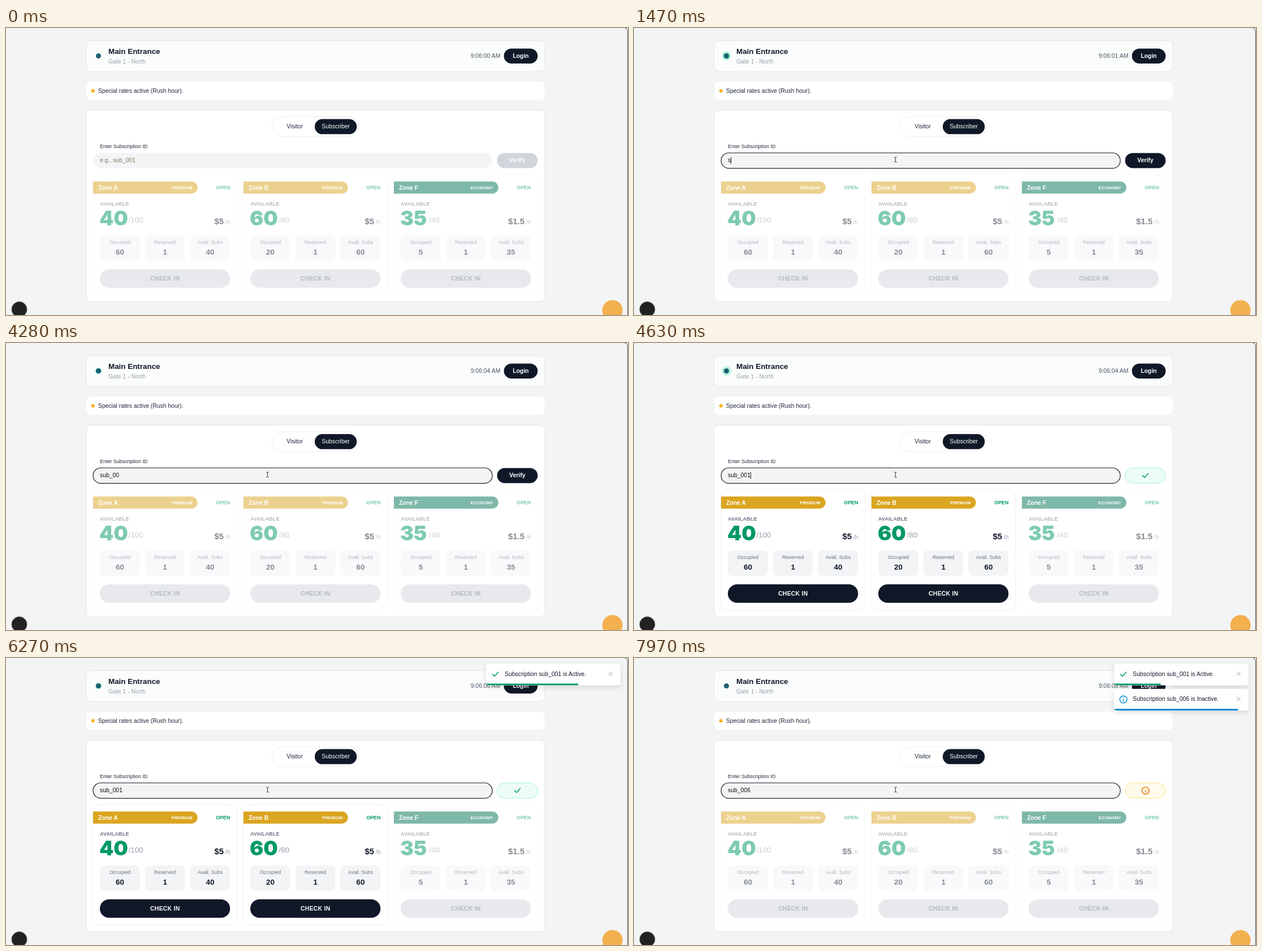
An HTML page that plays this animation: 1100 px wide and 509 px high, repeating every 8000 ms.

```html
<!DOCTYPE html>
<html lang="en">
<head>
<meta charset="utf-8">
<title>Gate check-in</title>
<style>
  html, body { margin: 0; width: 100%; height: 100%; overflow: hidden; background: #f3f4f6; }
  svg { display: block; font-family: "Liberation Sans", Arial, sans-serif; }
  .card { filter: drop-shadow(0 .7px 1px rgba(0,0,0,.14)); }
  .toast { filter: drop-shadow(0 3px 5px rgba(0,0,0,.12)); }
  .line { fill: none; stroke-linecap: round; stroke-linejoin: round; }
</style>
</head>
<body>
<svg id="stage" width="1100" height="509" viewBox="0 0 1100 509"></svg>
<script>
const LOOP = 8000;
const INK = '#101828', GREEN = '#009966', MUTED = '#6a7282', PALE = '#99a1af', FIELD = '#f3f4f6';
const XS = 7.44, S = 8.93, M = 10.42, L = 13.4, XL = 14.9;

const rect = (x, y, w, h, r, fill, more = '') =>
  `<rect x="${x}" y="${y}" width="${w}" height="${h}" rx="${r}" fill="${fill}" ${more}/>`;
const circle = (x, y, r, fill, more = '') => `<circle cx="${x}" cy="${y}" r="${r}" fill="${fill}" ${more}/>`;
const text = (x, y, size, fill, str, more = '') =>
  `<text x="${x}" y="${y}" font-size="${size}" fill="${fill}" ${more}>${str}</text>`;
const line = (d, color, width = 1.3) => `<path class="line" d="${d}" stroke="${color}" stroke-width="${width}"/>`;
const bold = 'font-weight="700"', mid = 'text-anchor="middle"', end = 'text-anchor="end"';
const spaced = px => `letter-spacing="${px}"`;

const tick = (x, y, color) => line(`M${x - 5} ${y}l3.4 3.7l6.6 -7.4`, color, 1.5);
const info = (x, y, color) =>
  circle(x, y, 6.3, 'none', `stroke="${color}" stroke-width="1.4"`) +
  line(`M${x} ${y}v3M${x} ${y - 2.8}v.1`, color, 1.5);

function zone(id, x, name, tier, strip, free, total, price, taken) {
  const stats = [['Occupied', taken], ['Reserved', 1], ['Avail. Subs', free]].map(([label, n], i) => {
    const left = x + 12 + i * 79.7;
    return rect(left, 368, 70.7, 45, 8, FIELD) +
      text(left + 35.5, 383.3, S, MUTED, label, mid) +
      text(left + 35.5, 401.5, XL * .9, INK, n, mid + ' ' + bold);
  }).join('');
  return `<g id="${id}" opacity=".5">
    ${rect(x, 260.5, 254.5, 212.5, 12, '#fff', 'class="card"')}
    <path d="M${x} 272.3h174a10.7 10.7 0 0 1 0 21.4h-174z" fill="${strip}"/>
    ${text(x + 9, 286.7, M, '#fff', name, bold)}
    ${text(x + 175.8, 285.5, XS, '#fff', tier, `${bold} ${end} ${spaced(.25)}`)}
    ${text(x + 242.5, 286.1, S, GREEN, 'OPEN', bold + ' ' + end)}
    ${text(x + 12, 314.6, S, MUTED, 'AVAILABLE', bold + ' ' + spaced(.2))}
    ${text(x + 11, 349.5, 36, GREEN, free, 'font-weight="900" style="font-family:Inter,sans-serif"')}
    ${text(x + 62.5, 344.5, L, PALE, '/' + total)}
    ${text(x + 231, 348, XL, INK, price, bold + ' ' + end)}
    ${text(x + 242.5, 348, M, PALE, '/h', end)}
    ${stats}
    ${rect(x + 12, 428, 230.3, 32.8, 16.4, '#d1d5dc', 'class="button"')}
    ${text(x + 127.3, 447.6, M, MUTED, 'CHECK IN', `class="caption" ${bold} ${mid} ${spaced(.26)}`)}
  </g>`;
}

const toast = (id, y, icon, message, color) => `<g id="${id}" class="toast">
  <clipPath id="${id}Clip">${rect(849, y, 238, 38.5, 5, '#fff')}</clipPath>
  ${rect(849, y, 238, 38.5, 5, '#fff')}
  ${icon(865.5, y + 18.7, color)}
  ${text(882, y + 21.6, M, INK, message)}
  ${line(`M1066.3 ${y + 14.8}l6 6m0 -6l-6 6`, PALE, 1)}
  <g clip-path="url(#${id}Clip)">${rect(849, y + 35.4, 238, 3.1, 0, color, `id="${id}Bar"`)}</g>
</g>`;

document.getElementById('stage').innerHTML = `
  ${rect(0, 0, 1100, 509, 0, FIELD)}
  ${line('M1095 .5q4 .5 4.3 5V509', '#4a4d52', 1)}
  ${rect(142.3, 23, 810, 53.7, 8, '#fbfdfc', 'class="card"')}
  ${circle(163.5, 49.5, 4.5, '#00d492', 'id="ping"')}
  ${circle(163.5, 49.5, 4.5, '#1d5f70')}
  ${text(181, 46.4, L, INK, 'Main Entrance', bold)}
  ${text(181, 63, M, PALE, 'Gate 1 - North')}
  ${text(821.7, 52.9, M, '#4a5565', '', 'id="clock"')}
  ${rect(880.5, 36.4, 59.7, 26.6, 13.3, INK)}
  ${text(910.3, 53, M, '#fff', 'Login', bold + ' ' + mid)}

  ${rect(142, 95, 810.5, 32.3, 8, '#fff')}
  ${circle(153.8, 111.4, 3.1, '#f9b123')}
  ${text(162.7, 114.6, M, '#1e2939', 'Special rates active (Rush hour).')}

  ${rect(142.3, 146.3, 810, 338.7, 8, '#fff', 'class="card"')}
  ${rect(471, 158, 152, 33.8, 16.9, '#fff', 'class="card"')}
  ${text(510.5, 178, M, '#1e2939', 'Visitor', mid)}
  ${rect(546, 161.5, 74.3, 26.8, 13.4, INK)}
  ${text(583.1, 178, M, '#fff', 'Subscriber', mid)}
  ${text(166, 212.9, S, '#1e2939', 'Enter Subscription ID')}
  ${rect(154, 221.5, 706, 27.3, 13.6, FIELD, 'id="field" stroke-width="1.2"')}
  ${text(166, 238.3, M, '#101010', '', 'id="entry"')}
  ${rect(0, 229, .9, 12, 0, '#000', 'id="caret"')}
  ${rect(868.5, 221.7, 71.7, 26.8, 13.4, INK, 'id="verify"')}
  <g id="verifyText">${text(904.3, 238.3, M, '#fff', 'Verify', bold + ' ' + mid)}</g>
  <g id="okIcon">${tick(904.5, 235, GREEN)}</g>
  <g id="infoIcon">${info(904.5, 235.2, '#e17100')}</g>

  ${zone('zoneA', 154, 'Zone A', 'PREMIUM', '#daa520', 40, 100, '$5', 60)}
  ${zone('zoneB', 420, 'Zone B', 'PREMIUM', '#daa520', 60, 80, '$5', 20)}
  ${zone('zoneF', 686, 'Zone F', 'ECONOMY', '#007355', 35, 40, '$1.5', 5)}

  ${circle(23.5, 499, 13.5, '#222', 'stroke="#555" stroke-width="1"')}
  ${circle(1072.5, 500.5, 18, '#f3b04f')}

  ${toast('good', 10, tick, 'Subscription sub_001 is Active.', GREEN)}
  ${toast('bad', 54.8, info, 'Subscription sub_006 is Inactive.', '#0084d1')}

  <path id="arrow" d="M0 0V11.5L2.7 9L4.5 13L6.2 12.2L4.5 8.4H8Z" fill="#fff" stroke="#000" stroke-width=".8"/>
  <g id="beam">${line('M460.5 229.2h1.2l.8 .6l.8 -.6h1.2M462.5 229.8v7.4M460.5 237.8h1.2l.8 -.6l.8 .6h1.2', '#222', .9)}</g>
`;

const el = id => document.getElementById(id);
const set = (node, attrs) => { for (const k in attrs) node.setAttribute(k, attrs[k]); };
const show = (id, on) => set(el(id), { visibility: on ? 'visible' : 'hidden' });
const clamp = v => Math.max(0, Math.min(1, v));
const easeOut = v => 1 - (1 - v) ** 2.4;

const FOCUS = 940;
const KEYS = [[FOCUS, ''], [1350, 's'], [1820, 'su'], [2650, 'sub'], [3050, 'sub_'], [3400, 'sub_0'],
  [3750, 'sub_00'], [4330, 'sub_001'], [6740, 'sub_00'], [7250, 'sub_006']];

function drawEntry(t) {
  const focused = t >= FOCUS;
  const [since, value] = KEYS.filter(k => k[0] <= t).pop() || [0, ''];
  const entry = el('entry');
  entry.textContent = value || 'e.g., sub_001';
  set(entry, { fill: value ? '#101010' : '#75805f' });
  set(el('field'), { stroke: focused ? '#1e2228' : 'none' });
  show('caret', focused && (t - since) % 1000 < 500);
  set(el('caret'), { x: 166 + (value ? entry.getComputedTextLength() : 0) });
  return value;
}

function drawResult(t, value) {
  const ok = t >= 4500 && t < 6740, inactive = t >= 7500;
  const [fill, stroke] = ok ? ['#ecfdf5', '#a4f4cf'] : inactive ? ['#fffbeb', '#fee685']
    : [value ? INK : '#d1d5dc', 'none'];
  set(el('verify'), { fill, stroke });
  show('verifyText', !ok && !inactive);
  show('okIcon', ok);
  show('infoIcon', inactive);
  for (const id of ['zoneA', 'zoneB']) {
    const card = el(id);
    set(card, { opacity: ok ? 1 : .5 });
    set(card.querySelector('.button'), { fill: ok ? INK : '#d1d5dc' });
    set(card.querySelector('.caption'), { fill: ok ? '#fff' : MUTED });
  }
}

function drawToast(id, age) {
  set(el(id), { opacity: clamp(age / 150) });
  set(el(id + 'Bar'), { width: 238 * (1 - clamp(age / 5040)) });
}

function drawPointer(t) {
  const p = easeOut(clamp((t - 70) / 730));
  const x = 1060 - 598 * p, y = 509 - 276 * p;
  const overField = x < 860 && y < 249;
  show('arrow', t >= 70 && !overField);
  show('beam', overField);
  set(el('arrow'), { transform: `translate(${x} ${y})` });
  set(el('beam'), { transform: `translate(${x - 462} ${y - 233})` });
}

function draw(t) {
  el('clock').textContent = `9:06:0${Math.floor((t + 200) / 1000) % 9} AM`;
  const phase = clamp((t + 780) % 1000 / 750);
  set(el('ping'), { r: 4.5 * (1 + easeOut(phase)), opacity: .6 * (1 - phase) });
  drawResult(t, drawEntry(t));
  drawToast('good', t - 4680);
  drawToast('bad', t - 7570);
  drawPointer(t);
}

const start = performance.now();
(function loop() {
  draw((performance.now() - start) % LOOP);
  requestAnimationFrame(loop);
})();
</script>
</body>
</html>
```
